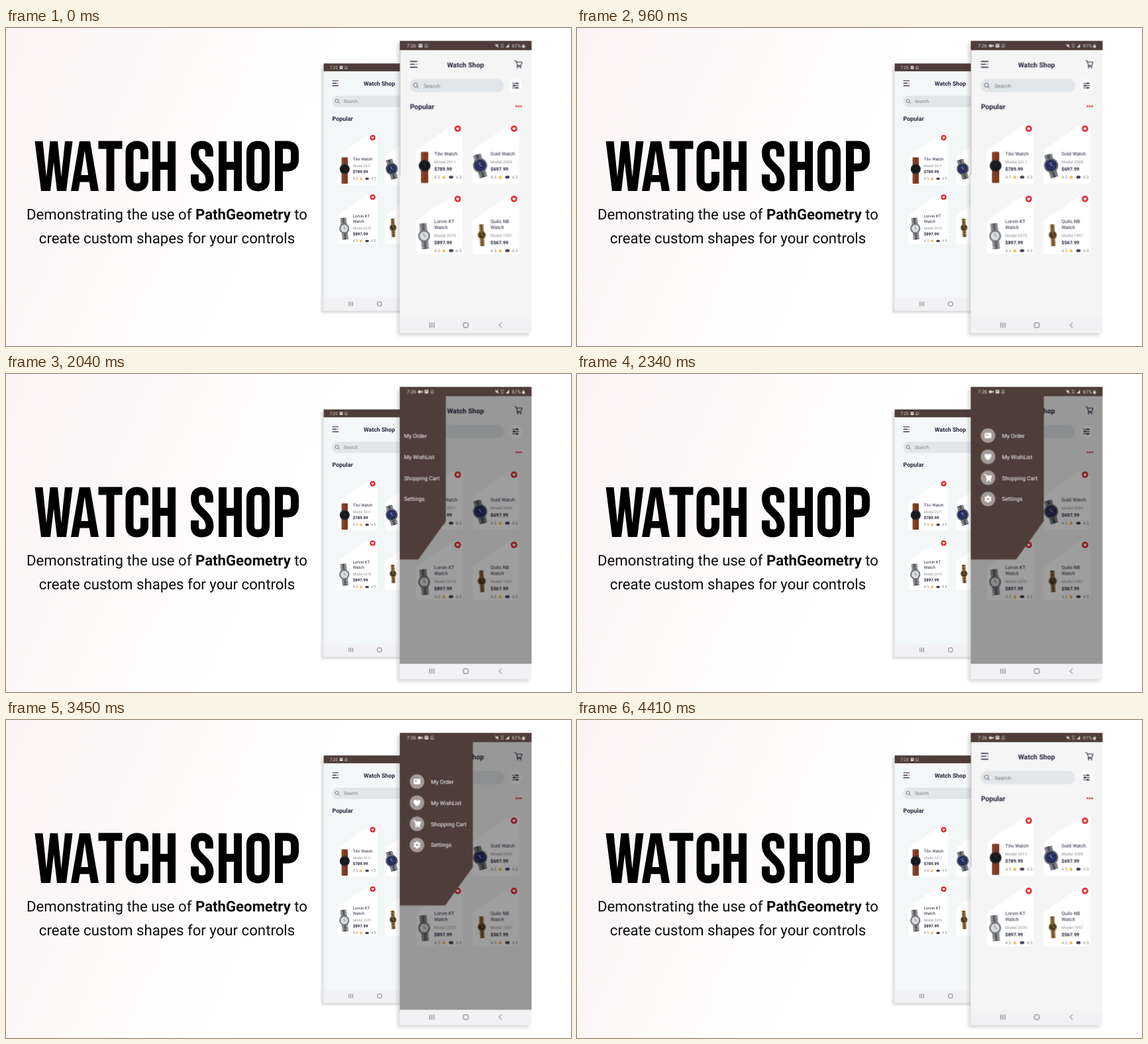
Animation, 853 px wide and 480 px high, one loop 4.47 s. Source, as an HTML page:

```html
<!DOCTYPE html>
<html lang="en">
<head>
<meta charset="utf-8">
<title>Watch Shop</title>
<style>
  html, body { margin: 0; width: 100%; height: 100%; overflow: hidden; background: #fff; }
  svg { display: block; width: 853px; height: 480px; font-family: Roboto, sans-serif; text-rendering: geometricPrecision; }
  .phone { filter: drop-shadow(-4px 4px 2px rgba(60, 50, 60, .17)); }
  .bold { font-weight: 700; }
  .line { fill: none; stroke: currentColor; stroke-linecap: round; stroke-linejoin: round; }
  .rec, .notes, .shade, .drawer { animation: 4470ms infinite; }
  .rec { animation-name: rec; animation-timing-function: step-end; }
  .notes { animation-name: notes; animation-timing-function: step-end; }
  .shade { animation-name: shade; animation-timing-function: linear; }
  .drawer { animation-name: drawer; }
  @keyframes rec { 0% { opacity: 0 } 12.75%, 100% { opacity: 1 } }
  @keyframes notes { 0% { transform: none } 12.75%, 100% { transform: translateX(9px) } }
  @keyframes shade {
    0%, 43.42% { opacity: 0 }
    44.7%, 82.5% { opacity: .38 }
    83.89%, 100% { opacity: 0 }
  }
  @keyframes drawer {
    0% { transform: translateX(-110px) }
    43.42% { transform: translateX(-110px); animation-timing-function: cubic-bezier(.39, .575, .565, 1) }
    48.79% { transform: none }
    78.52% { transform: none; animation-timing-function: cubic-bezier(.39, .575, .565, 1) }
    83.89%, 100% { transform: translateX(-110px) }
  }
</style>
</head>
<body>
<svg viewBox="0 0 853 480">
  <defs>
    <linearGradient id="paper" x2="1" y2=".25">
      <stop stop-color="#faf3f4"/><stop offset=".3" stop-color="#fdf9f9"/><stop offset=".62" stop-color="#fff"/>
    </linearGradient>
    <clipPath id="screen"><rect y="14" width="199" height="404"/></clipPath>
    <path id="heart" d="M0 2.6C-4-.4-2.4-2.4-1.3-2.4Q-.4-2.4 0-1.5Q.4-2.4 1.3-2.4C2.4-2.4 4-.4 0 2.6Z"/>
    <path id="cart" class="line" d="M-5.5-5H-3.4L-1.4 2H4L5.6-3H-2.8M-1.4 2L-2 3.6H4.2"/>
    <path id="star" d="M0-3L.9-1 3-.8 1.4.6 1.9 2.8 0 1.7-1.9 2.8-1.4.6-3-.8-.9-1Z"/>
  </defs>
  <rect width="853" height="480" fill="url(#paper)"/>

  <g role="img" aria-label="WATCH SHOP" fill="none" stroke="#000" stroke-width="12">
    <g fill="#000" stroke="none" fill-rule="evenodd">
      <path transform="translate(43.5 171)" d="M0 0H12L17.5 54 23 0H34.5L40 54 45.5 0H57L47.5 75H33.5L28.5 32 23.5 75H9.5Z"/>
      <path transform="translate(98 171)" d="M13 0H29L42 75H30L27.7 61.4H13.7L11.4 75H0ZM20.8 14L26.1 51H15.4Z"/>
    </g>
    <path transform="translate(139.5 171)" d="M0 5.5H36M18 0V75"/>
    <path transform="translate(180.5 171)" d="M28.5 27V17Q28.5 5.5 17.2 5.5T6 17V58Q6 69.5 17.2 69.5T28.5 58V46"/>
    <path transform="translate(221 171)" d="M6 0V75M29 0V75M6 37H29"/>
    <path transform="translate(279 171)" d="M28 23V17Q28 5.5 17 5.5T6 17Q6 27 12 33L22 43Q28.5 50 28.5 58Q28.5 69.5 17 69.5T6 58V50"/>
    <path transform="translate(321 171)" d="M6 0V75M29 0V75M6 37H29"/>
    <path transform="translate(363 171)" d="M6 17Q6 5.5 17.5 5.5T29 17V58Q29 69.5 17.5 69.5T6 58Z"/>
    <path transform="translate(406 171)" d="M6 75V5.5H18Q30 5.5 30 17V28Q30 39.5 18 39.5H6"/>
  </g>
  <g font-size="22.2" text-anchor="middle" fill="#0c0c0c">
    <text x="243" y="289">Demonstrating the use of <tspan class="bold">PathGeometry</tspan> to</text>
    <text x="243" y="324.8">create custom shapes for your controls</text>
  </g>

  <g class="phone" id="back" transform="translate(479.6 53.5) scale(.846)"></g>
  <g class="phone" id="front" transform="translate(594.5 19.4)"></g>
</svg>

<script>
const ink = '#25223a', brown = '#4f3d3a';
const at = (x, y, body, extra = '') => `<g transform="translate(${x} ${y}) ${extra}">${body}</g>`;
const text = (x, y, size, fill, str, cls = '') =>
  `<text x="${x}" y="${y}" font-size="${size}" fill="${fill}" class="${cls}">${str}</text>`;
const box = (x, y, w, h, fill, r = 0) =>
  `<rect x="${x}" y="${y}" width="${w}" height="${h}" rx="${r}" fill="${fill}"/>`;
const disc = (x, y, r, fill, extra = '') => `<circle cx="${x}" cy="${y}" r="${r}" fill="${fill}" ${extra}/>`;
const line = (d, color, w = 1) => `<path class="line" d="${d}" color="${color}" stroke-width="${w}"/>`;
const use = (id, x, y, fill, scale = 1) => at(x, y, `<use href="#${id}" fill="${fill}"/>`, `scale(${scale})`);

// Bracelet links above and below the case
const links = (w, h, a, b) => {
  let out = '';
  for (let y = -h; y < h; y += 3) out += box(-w / 2, y, w, 2.7, a, .7) + box(-w / 6, y, w / 3, 2.7, b);
  return out;
};
const hands = color => line('M0 0V-3.6M0 0L2.4 1.4', color, .6);

const watches = [
  at(13, 61.5, box(-5.5, -21, 11, 47, '#7d3a20', 1.5) + box(-4, -20, 2, 45, '#96492b') +
    disc(0, 0, 9, '#2b2d31') + disc(0, 0, 7.2, '#15181c') + hands('#454b52')),
  at(11.8, 61, links(12, 17, '#6f737b', '#43464d') + disc(0, 0, 10.8, '#62666f') +
    disc(0, 0, 8.4, '#22264f') + disc(0, 0, 6, '#343b78') +
    disc(-3, 0, 1.7, '#1d2046') + disc(3, 0, 1.7, '#1d2046') + disc(0, 3, 1.7, '#1d2046') + hands('#c3c7d8'),
    'rotate(-16)'),
  at(12.3, 61.5, links(11, 19, '#808387', '#505357') + disc(0, 0, 9, '#74777b') +
    disc(0, 0, 6.6, '#d9dcdf') + hands('#555'), 'rotate(-6)'),
  at(14.3, 60, links(7, 16, '#8f6a35', '#5a401f') + disc(0, 0, 6.2, '#866231') +
    disc(0, 0, 4.4, '#42321f') + hands('#d8bb7c'), 'rotate(-3)')
];

const goods = [
  [['Tilvi Watch'], 2011, '789.99'],
  [['Gold Watch'], 2009, '697.99'],
  [['Lorvin KT', 'Watch'], 2070, '897.99'],
  [['Quilo NB', 'Watch'], 1997, '567.99']
];

const card = ([name, model, price], i) => {
  const low = 5 * (name.length - 1);
  return at(24.5 + 85 * (i % 2), 127 + 106 * (i >> 1),
    `<path fill="#fff" d="M0 43Q0 39 4 36L49 4Q54 0 59 0H66Q71 0 71 5V84Q71 89 66 89H5Q0 89 0 84Z"/>` +
    watches[i] +
    name.map((s, k) => text(27.6, 46.4 - low * .8 + 8.7 * k, 7.2, ink, s)).join('') +
    text(27.6, 57.6 + low, 6.2, '#8d8d95', 'Model ' + model) +
    text(27.6, 69 + low, 7.2, ink, '$' + price, 'bold') +
    text(27.6, 81 + low, 6.4, '#85858d', '4.5') + text(60, 81 + low, 6.4, '#85858d', '4.5') +
    use('star', 42, 78.7 + low, '#f5b22c') +
    `<ellipse cx="53" cy="${78.7 + low}" rx="3.2" ry="2.1" fill="${ink}"/>` + disc(53, 78.7 + low, .8, '#aaa') +
    disc(63, 5.5, 4.8, '#e3161f') + use('heart', 63, 5.7, '#fff', .95));
};

const pale = '#ded6d4';
const status = (time, live) =>
  box(0, 0, 199, 14, brown) + text(10.5, 10.4, 7.4, pale, time) +
  (live ? `<g class="rec">${box(27.5, 5.4, 4.5, 4, pale, .8)}<path fill="${pale}" d="M31.5 7.4L34.5 5.4V9.4Z"/></g>` : '') +
  `<g class="${live ? 'notes' : ''}">` + box(28.5, 4.5, 5.6, 5.6, pale, .8) + box(29.7, 6.2, 3.2, .9, brown) +
  line('M37.5 8.9H42.5Q41.6 8 41.6 6.4Q41.6 4.6 40 4.6T38.4 6.4Q38.4 8 37.5 8.9M39.5 10.2H40.5', pale, .7) + '</g>' +
  `<path fill="${pale}" d="M144.5 6H146L148.3 4.2V10L146 8.2H144.5ZM160 10L165 4.6V10Z"/>` +
  line('M144 4.4L149.5 9.8M153.5 4.5V6.3M156 4.5V6.3M153.5 10V8M156 8V10', pale, .8) +
  text(169.3, 10.4, 7.4, pale, '61%') + box(184.8, 6.8, 4, 3.6, pale, .6) + line('M185.7 6.8V5.7Q186.8 4.1 187.9 5.7V6.8', pale, .7);

const app = (time, live) =>
  box(0, 0, 199, 441, live ? '#f5f5f6' : '#f4f7f7') + box(0, 418, 199, 23, '#f2f2f4') + status(time, live) +
  line('M16 31H26M16 35.4H22.8M16 39.8H26', ink, 1.4) + disc(25.8, 35.4, .8, '#e3161f') +
  text(71.4, 39.8, 10.4, ink, 'Watch Shop', 'bold') +
  `<g color="${ink}" stroke-width="1">${use('cart', 179, 35, 'none')}</g>` +
  disc(177.7, 40.4, .9, ink) + disc(182.5, 40.4, .9, ink) +
  box(15.5, 57.6, 141.5, 20, '#e2e6e8', 9) + disc(23.7, 66.8, 3, 'none', 'stroke="#6b6e78"') +
  line('M26 69L28.4 71.5', '#6b6e78', 1) + text(36, 70.7, 8.1, '#7b7e86', 'Search') +
  disc(174.7, 67.5, 10, '#fff') + line('M170 64.1H179.5M170 67.5H179.5M170 70.9H179.5', ink, 1) +
  disc(176.7, 64.1, 1.4, ink) + disc(172.7, 67.5, 1.4, ink) + disc(176.7, 70.9, 1.4, ink) +
  text(15.4, 102.8, 10.5, ink, 'Popular', 'bold') +
  [176.2, 179.7, 183.2].map(x => disc(x, 98.8, 1.3, '#e3161f')).join('') +
  goods.map(card).join('') +
  line('M45.3 425.6V432.6M48.5 425.6V432.6M51.7 425.6V432.6M153.5 425.6L149.8 429.1 153.5 432.6', '#6a6669', 1) +
  `<rect x="96" y="425.5" width="7.4" height="7.2" rx="2" fill="none" stroke="#6a6669"/>`;

const gear = [0, 60, 120].map(a => `<rect x="-1.4" y="-5.4" width="2.8" height="10.8" fill="#fff" transform="rotate(${a})"/>`).join('') +
  disc(0, 0, 4, '#fff') + disc(0, 0, 1.8, '#a39a98');
const icons = [
  box(-5, -4, 10, 8, '#fff', .8) + box(-3.6, -2.4, 4, 3, '#c9c2c0'),
  use('heart', 0, .3, '#fff', 2),
  at(0, 0, `<path fill="#fff" d="M-3.4-3.4H5.4L3.8 1.6H-1.6Z"/><g color="#fff" stroke-width="1.2">${use('cart', 0, 0, '#fff')}</g>`) +
    disc(-1.5, 5, 1, '#fff') + disc(3.6, 5, 1, '#fff'),
  gear
];
const menu = ['My Order', 'My WishList', 'Shopping Cart', 'Settings'].map((label, i) => {
  const y = 73.5 + 31.9 * i;
  return disc(26, y, 11, '#a39a98') + at(26, y, icons[i]) + text(47, y + 3.2, 8.5, '#fff', label);
}).join('');

document.getElementById('back').innerHTML = app('7:25', false);
document.getElementById('front').innerHTML = app('7:26', true) +
  `<g clip-path="url(#screen)"><rect class="shade" y="14" width="199" height="404" opacity="0"/>` +
  `<g class="drawer"><path fill="${brown}" d="M0 14H110.3V202.5L68.5 260.5H0Z"/>${menu}</g></g>`;
</script>
</body>
</html>
```
